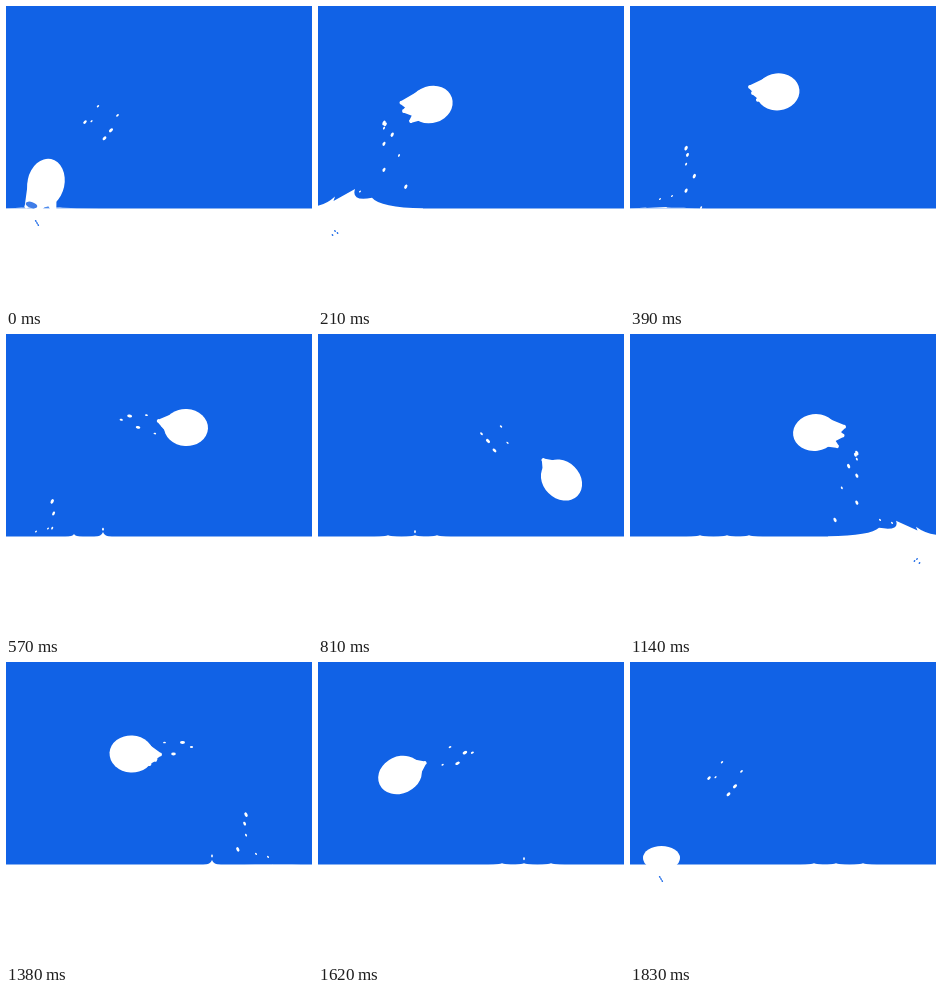
Animation, 306 px wide and 300 px high, one loop 1860 ms. Source, as an HTML page with a canvas:

```html
<!DOCTYPE html>
<html lang="en">
<head>
<meta charset="utf-8">
<title>Leaping drop</title>
<style>
html, body { margin: 0; width: 100%; height: 100%; overflow: hidden; background: #1162e6; }
canvas { display: block; }
</style>
</head>
<body>
<canvas id="stage" width="306" height="300"></canvas>
<script>
const ctx = document.getElementById('stage').getContext('2d');
const BLUE = '#1162e6', WHITE = '#fff';
const HALF = 930, FLIGHT = 900, STEP = 30, LEVEL = 202.5;
const RADIUS = 18.5, DEG = Math.PI / 180;

// Key points of a leap: time, x, y, heading, half length of the body
const leaps = [
  {side: 1, keys: [
    [0, 40, 177, -78, 24.5], [210, 113, 98.5, -18, 22], [570, 180, 93.5, 3, 22],
    [810, 243.5, 146, 45, 22.5], [FLIGHT, 264, 195, 90, 12]
  ]},
  {side: -1, keys: [
    [0, 262, 177, -78, 24.5], [210, 185, 98.5, 8, 22], [450, 125.5, 92, -3, 22],
    [690, 82, 113, 25, 22.5], [FLIGHT, 31.5, 196, 90, 12]
  ]}
];

const clamp = v => Math.max(0, Math.min(1, v));

// Smooth curve through keyed rows
function sample(keys, t) {
  const last = keys.length - 1;
  if (t >= keys[last][0]) return keys[last];
  let i = 0;
  while (t >= keys[i + 1][0]) i++;
  const a = keys[i], b = keys[i + 1], before = keys[Math.max(i - 1, 0)], after = keys[Math.min(i + 2, last)];
  const d = b[0] - a[0], s = (t - a[0]) / d, s2 = s * s, s3 = s2 * s;
  return a.map((v, k) => {
    const ma = (b[k] - before[k]) / (b[0] - before[0]) * d;
    const mb = (after[k] - v) / (after[0] - a[0]) * d;
    return (2 * s3 - 3 * s2 + 1) * v + (s3 - 2 * s2 + s) * ma + (3 * s2 - 2 * s3) * b[k] + (s3 - s2) * mb;
  });
}

function oval(x, y, rx, ry, angle) {
  ctx.beginPath();
  ctx.ellipse(x, y, rx, ry, angle * DEG, 0, 7);
  ctx.fill();
}

const droplet = (x, y, size, angle) => oval(x, y, size * 1.35, size * .8, angle);

function mirrored(axis, draw) {
  ctx.save();
  ctx.translate(axis, 0);
  ctx.scale(-1, 1);
  draw();
  ctx.restore();
}

function tailTip(angle, reach, spread, base) {
  if (reach < base) return;
  ctx.save();
  ctx.rotate(angle * DEG);
  ctx.beginPath();
  ctx.moveTo(Math.cos(spread) * base, -Math.sin(spread) * base);
  ctx.arc(reach - 1, 0, 2, -Math.PI / 2, Math.PI / 2);
  ctx.lineTo(Math.cos(spread) * base, Math.sin(spread) * base);
  ctx.fill();
  ctx.restore();
}

// The body, with a ragged tail that closes during the flight
function leaper({keys, side}, t) {
  const [, x, y, heading, length] = sample(keys, t);
  const s = clamp(t / FLIGHT), fan = 28 * (1 - s);
  const back = Math.min(1, length / 22) ** 2;
  ctx.save();
  ctx.translate(x, y);
  ctx.scale(side, 1);
  oval(0, 0, length, RADIUS, heading);
  const tailHeading = side > 0 ? heading : heading - 24 * (1 - s) * clamp(t / 210);
  [1, .2, -1].forEach((lean, i) => {
    const reach = (31.5 - s * (4 + 8 * i)) * back;
    tailTip(tailHeading + 180 + fan * lean, reach, 1 - i * .33, Math.min(length, RADIUS) - .5);
  });
  ctx.restore();
}

// Drops lag further behind the body and sink as the leap ends
function trail({keys, side}, t) {
  const s = clamp(t / FLIGHT);
  if (s < .48) return;
  const x = sample(keys, t)[1];
  const k = clamp((s - .55) / .35), fall = clamp((s - .55) / .45) ** 2;
  for (let i = s > .92 ? -1 : 0; i < 5; i++) {
    const swing = Math.sin(1.4 * (i - 1.5));
    const lag = 24 + 30 * k + (9 - 2.5 * k) * i;
    const top = i % 2 ? 80.5 : 99 - 3.5 * i;
    droplet(x - side * lag, top + (30 + 16 * swing) * fall, 1.4 + .5 * swing, side * 45 * k);
  }
}

// Falling streak of drops left by the take-off
function spray(t) {
  if (t < 100 || t > 630) return;
  const dt = t - 210;
  for (let i = 0; i < 8; i++) {
    const x = 64 + (i % 2 ? 3.4 * i : 2) - .055 * dt;
    const y = 117 + 1.3 * i * i + (.14 + .03 * i) * dt;
    if (y < LEVEL) droplet(x, y, 1.5 + .4 * Math.sin(2 * i + 1), -65);
  }
  for (let i = 0; i < 2; i++) droplet(30 + 12 * i, 188.5 - 3 * i + .025 * dt, .9, -45);
}

function splash(t) {
  const h = t < 210 ? Math.min(1, .08 + t / 160) : Math.exp((205 - t) / 70);
  ctx.save();
  ctx.translate(0, LEVEL);
  ctx.scale(1, h);
  ctx.beginPath();
  ctx.moveTo(-4, 1);
  ctx.lineTo(-4, -2);
  ctx.quadraticCurveTo(8, -4, 17, -13);
  ctx.lineTo(15.5, -8);
  ctx.lineTo(37, -21);
  ctx.quadraticCurveTo(33, -7, 54, -11.5);
  ctx.quadraticCurveTo(62, -1, 105, 0);
  ctx.lineTo(105, 1);
  ctx.fill();
  ctx.restore();
}

function ripple(x, height, width) {
  ctx.beginPath();
  ctx.moveTo(x - width, LEVEL + .5);
  ctx.quadraticCurveTo(x - width * .15, LEVEL, x, LEVEL - height);
  ctx.quadraticCurveTo(x + width * .15, LEVEL, x + width, LEVEL + .5);
  ctx.fill();
}

function shore(t) {
  if (t >= 0) splash(t);
  if (t >= 420 && t < 660) {
    ripple(97, 4.5, 9);
    if (t > 500) ripple(68, 2.5, 9);
  }
  if (t >= 660 && t < 1200) for (const x of [70, 97, 119]) ripple(x, 1.2, 14);
  if (t >= 420 && t < 840) droplet(97, 194 + .011 * (t - 465), 1.1, 90);
}

function bubbles(t) {
  if (t < -30 || t > 360) return;
  const k = Math.max(0, t / 210);
  for (let i = 0; i < 3; i++) {
    const x = 31 - 14 * k + (i - 1) * (1.2 + 1.3 * k);
    const y = 217 + 11 * k + (i - 1) * (2 - 3 * k) - (i % 2) * 3 * k;
    oval(x, y, 1, .8, 45);
  }
}

// Pale gap below the body as it breaks away
function gap(t) {
  if (t < 0 || t >= STEP) return;
  ctx.fillStyle = '#3f7de8';
  oval(25.5, 199, 6, 3, 18);
}

function render(t) {
  const left = t > 1700 ? t - 2 * HALF : t, right = t - HALF;
  const half = t < HALF ? 0 : 1, phase = t - half * HALF;
  ctx.fillStyle = BLUE;
  ctx.fillRect(0, 0, 306, 300);
  ctx.fillStyle = WHITE;
  ctx.fillRect(0, LEVEL, 306, 300 - LEVEL);

  shore(left);
  spray(left);
  mirrored(303, () => shore(right + 15));
  mirrored(292, () => spray(right + 15));
  trail(leaps[half], phase);
  if (phase < 60) trail(leaps[1 - half], FLIGHT);
  leaper(leaps[half], phase);

  ctx.fillStyle = BLUE;
  bubbles(left);
  mirrored(304, () => bubbles(right));
  gap(left);
  mirrored(302, () => gap(right));
}

function frame(now) {
  const t = now % (2 * HALF);
  render(Math.floor(t / STEP) * STEP);
  requestAnimationFrame(frame);
}
render(0);
requestAnimationFrame(frame);
</script>
</body>
</html>
```
